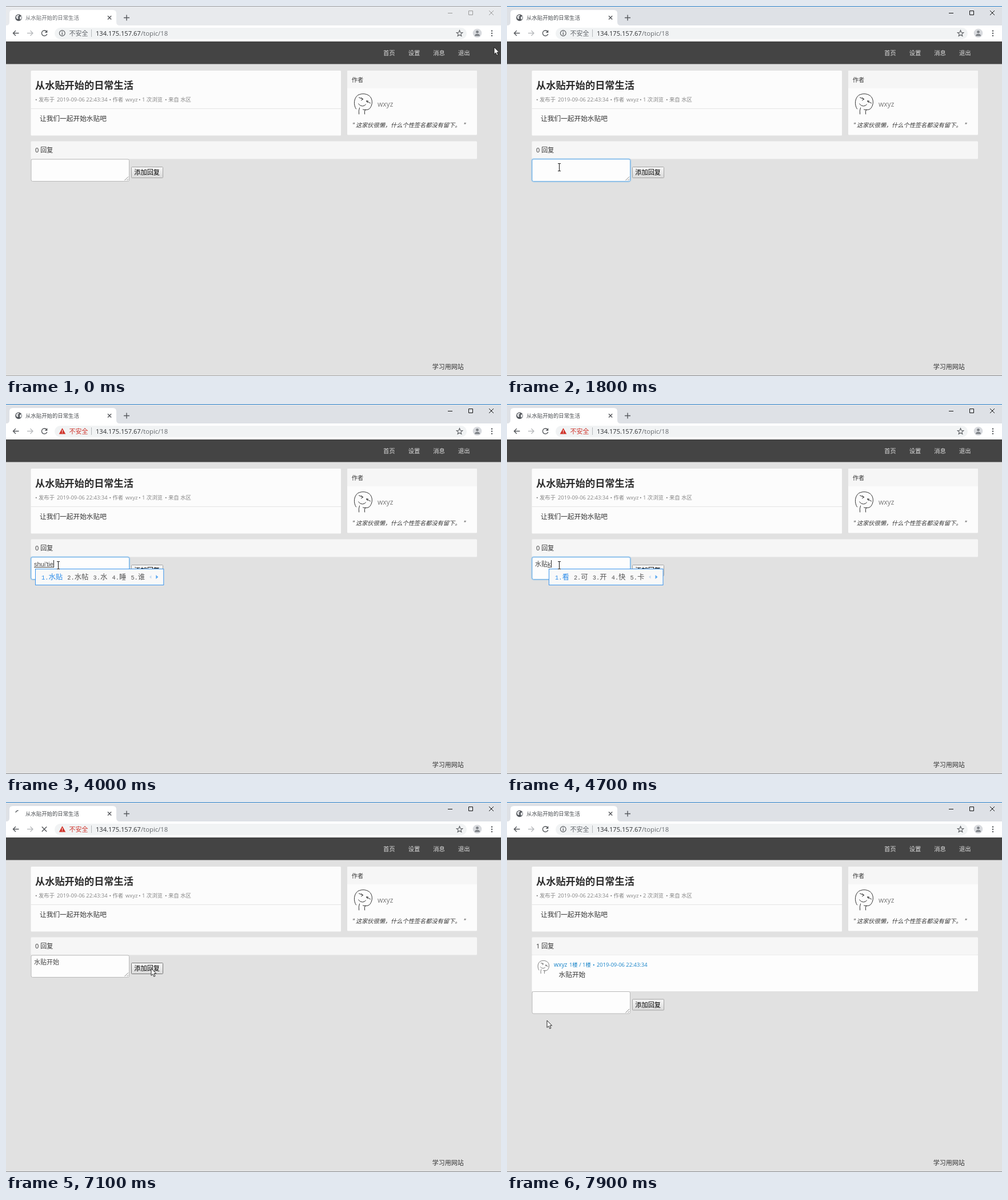
Recreate the animation shown at these times as an HTML page. Size 866 px wide and 647 px high, loop 8 s.

```html
<!DOCTYPE html>
<html lang="zh-CN">
<head>
<meta charset="utf-8">
<title>从水贴开始的日常生活</title>
<style>
html, body { margin: 0; width: 100%; height: 100%; overflow: hidden; background: #e1e1e1; }
svg { display: block; }
text { font-family: "Open Sans", "Noto Sans CJK SC", "Noto Sans CJK", sans-serif; white-space: pre; }
.line { fill: none; stroke: #55585c; stroke-width: 1.4; }
.meta { font-size: 9.4px; fill: #858585; }
.nav { font-size: 10.3px; fill: #dedede; }
.f11 { font-size: 11px; }
.body { font-size: 11.7px; fill: #333; }
.link { font-size: 9.4px; fill: #1482c8; }
#typed, #ime text { fill: #444; }
#typed { font-family: "Liberation Sans", "Noto Sans CJK SC", "Noto Sans CJK", sans-serif; font-size: 11px; }
#ime text { font-size: 12.4px; font-weight: 300; fill: #555; }
#ime text.first { fill: #2b8cea; }
#ime tspan { font-family: "Liberation Mono", monospace; font-size: 10.35px; }
</style>
</head>
<body>
<svg width="866" height="647" viewBox="0 0 866 647">
  <defs>
    <linearGradient id="face" x2="0" y2="1"><stop stop-color="#f7f7f7"/><stop offset="1" stop-color="#dadada"/></linearGradient>
    <g id="doodle" fill="none" stroke="#333" stroke-linecap="round">
      <path d="M4 27C-1 20 0 8 7 3 14-1 24 0 29 6 34 13 32 22 27 27 24 29 19 29 16 28M10 25Q8 30 9 36M20 28Q18 32 19 36"/>
      <path d="M9 7L16 10M13 7L16 10 13 12M22 13L29 17M25 13L22 13 24 16M8 18Q11 22 15 22 19 22 21 19"/>
    </g>
  </defs>

  <!-- browser frame -->
  <rect id="bar" width="866" height="34"/>
  <rect id="top" width="866" height="1"/>
  <path d="M0 34Q6 34 6 28V13Q6 7 12 7H187Q193 7 193 13V28Q193 34 199 34Z" fill="#fff"/>
  <rect y="34" width="866" height="28" fill="#fff"/>
  <g id="globe">
    <circle cx="22" cy="20.4" r="5.8" fill="#55595e"/>
    <path d="M18 18Q20 15 23 16L22 18 20 19 22 21 20 23Q17 21 18 18ZM24 19L27 18V22L25 24 24 22Z" fill="#e9eaec"/>
  </g>
  <path id="spin" d="M16.8 18.2A5.8 5.8 0 0 1 21.6 14.9" class="line"/>
  <text id="tab" x="34" y="24" font-size="9.4">从水贴开始的日常生活</text>
  <path class="line" d="M178 17.2L184.2 23.4M184.2 17.2L178 23.4"/>
  <path class="line" d="M206 20.5H216M211 15.5V25.5"/>
  <path id="win" fill="none" d="M773 12.5H781M809.5 8.5H816.5V15.5H809.5ZM845 8L853 16M853 8L845 16"/>
  <path class="line" d="M22.5 47.5H12.5M17 43L12.5 47.5 17 52"/>
  <path class="line" style="stroke:#b9bbbe" d="M37 47.5H47M42.5 43L47 47.5 42.5 52"/>
  <g id="reload">
    <path class="line" d="M71 44.5A4.8 4.8 0 1 0 71.8 49"/>
    <path d="M72.4 42V46.8H67.6Z" fill="#55585c"/>
  </g>
  <path id="stop" class="line" d="M62.8 43.2L71.2 51.8M71.2 43.2L62.8 51.8"/>
  <rect x="85" y="38" width="721" height="20" rx="10" fill="#f1f3f4"/>
  <g id="info">
    <circle cx="98.3" cy="47.5" r="4.9" class="line" style="stroke-width:1.1"/>
    <path d="M98.3 44.5V45.7M98.3 46.8V50.6" class="line"/>
  </g>
  <g id="warn">
    <path d="M98.5 42L104.3 52.5H92.7Z" fill="#d0342b"/>
    <path d="M98.5 45.6V48.8M98.5 49.8V51" stroke="#fff"/>
  </g>
  <text id="unsafe" x="110.5" y="51.5" class="f11">不安全</text>
  <rect x="149" y="41" width="1" height="13" fill="#b4b7ba"/>
  <text x="157" y="51.5" font-size="11.1" fill="#2b2d30">134.175.157.67</text>
  <text x="236" y="51.5" font-size="11.3" fill="#666a6e">/topic/18</text>
  <path d="M793.5 42.5L795 46.2 798.8 46.4 795.8 48.9 796.8 52.6 793.5 50.5 790.2 52.6 791.2 48.9 788.2 46.4 792 46.2Z" class="line" style="stroke-width:1.1"/>
  <circle cx="824.5" cy="47.5" r="7.8" fill="#d8dade"/>
  <path d="M820 52.5Q820 48.8 824.5 48.8T829 52.5Z" fill="#7c8085"/>
  <circle cx="824.5" cy="45.3" r="2.4" fill="#7c8085"/>
  <g fill="#55585c"><circle cx="850" cy="43.5" r="1.2"/><circle cx="850" cy="47.7" r="1.2"/><circle cx="850" cy="51.9" r="1.2"/></g>

  <!-- page -->
  <rect y="62" width="866" height="585" fill="#e1e1e1"/>
  <rect y="62" width="866" height="39.5" fill="#444"/>
  <g class="nav">
    <text x="660" y="86">首页</text><text x="703.7" y="86">设置</text>
    <text x="747.3" y="86">消息</text><text x="791" y="86">退出</text>
  </g>
  <rect x="43.5" y="113" width="542.5" height="113.5" rx="1.5" fill="#fcfcfc"/>
  <rect x="43.5" y="179" width="542.5" height="1" fill="#e4e4e4"/>
  <text x="51" y="145" font-size="17.2" font-weight="700" fill="#2c2c2c">从水贴开始的日常生活</text>
  <g class="meta">
    <text x="51" y="167">• 发布于</text><text x="89" y="167">2019-09-06 22:43:34</text>
    <text x="180.5" y="167">• 作者</text><text x="209" y="167">wxyz</text>
    <text id="views" x="232" y="167"></text><text x="278" y="167">• 来自 水区</text>
  </g>
  <text x="59" y="201.3" class="body">让我们一起开始水贴吧</text>
  <rect x="597" y="113" width="227" height="112.5" rx="1.5" fill="#fcfcfc"/>
  <rect x="597" y="113" width="227" height="31" rx="1.5" fill="#f6f6f6"/>
  <text x="604.8" y="132.6" font-size="10.2" fill="#333">作者</text>
  <use href="#doodle" x="608.5" y="153"/>
  <text x="650" y="175.5" font-size="12" fill="#777">wxyz</text>
  <g font-size="10.2" font-style="italic" fill="#333">
    <text x="606" y="212">"</text><text x="612" y="212">这家伙很懒，什么个性签名都没有留下。</text><text x="800.5" y="212">"</text>
  </g>
  <rect x="43.5" y="236.5" width="780.5" height="31" rx="1.5" fill="#f6f6f6"/>
  <text id="count" x="51" y="256.2" class="f11" fill="#333"></text>
  <g id="reply">
    <rect x="43.5" y="268" width="780.5" height="63" fill="#fdfdfd"/>
    <use href="#doodle" transform="translate(53.5 277) scale(.63)"/>
    <text x="82" y="288" font-size="10.3" fill="#1482c8">wxyz</text>
    <g class="link"><text x="109" y="288">1楼 / 1楼</text><text x="150" y="288">•</text><text x="157" y="288">2019-09-06 22:43:34</text></g>
    <text x="90.5" y="306" class="body">水贴开始</text>
  </g>
  <g id="form">
    <rect id="glow" x="43" y="267" width="173.5" height="40.5" rx="4" fill="none" stroke="#66afe9" stroke-width="2"/>
    <rect id="area" x="44" y="268" width="171.5" height="38.5" rx="2.5" fill="#fdfdfd"/>
    <path d="M207.5 305L214 298.5M211.5 305L214 302.5" stroke="#777" stroke-width=".9"/>
    <text id="typed" x="49" y="283.5"></text>
    <rect id="under" y="285" height="1" fill="#444"/>
    <rect id="caret" y="273" width="1" height="13" fill="#222"/>
    <rect id="btn" x="219.5" y="281.5" width="55" height="19" rx="1"/>
    <text x="224.3" y="295.3" font-size="11.2" fill="#000">添加回复</text>
  </g>
  <g id="ime"></g>
  <text x="745.7" y="634.6" class="f11" fill="#333">学习用网站</text>
  <rect id="bottom" y="646" width="866" height="1"/>
  <path id="arrow" d="M0 0V12.4L2.8 9.8 4.8 14.3 6.9 13.4 4.9 9H8.7Z" fill="#fff" stroke="#111" stroke-width=".9"/>
  <path id="beam" d="M-2.5-6.5H-.6L0-6 .6-6.5H2.5M0-6V6M-2.5 6.5H-.6L0 6 .6 6.5H2.5" fill="none" stroke="#222" stroke-width="1.1"/>
</svg>
<script>
const el = id => document.getElementById(id);
const show = (id, on) => el(id).style.display = on ? '' : 'none';
const set = (id, name, value) => el(id).setAttribute(name, value);
const write = (id, text) => { if (el(id).textContent !== text) el(id).textContent = text; };

// [start, committed text, composing text, candidates]
const typing = [
  [0, '', '', ''],
  [2300, '', 's', '是 上 说 时 三'],
  [2400, '', 'sh', '是 上 说 时 少'],
  [2500, '', 'shu', '数 输 书 熟 字符画：鼠'],
  [2700, '', 'shui', '水 睡 谁 税 说'],
  [4000, '', "shui'tie", '水贴 水帖 水 睡 谁'],
  [4400, '水贴', '', ''],
  [4700, '水贴', 'k', '看 可 开 快 卡'],
  [4900, '水贴', 'ka', '卡 咖 喀 咔 开'],
  [5100, '水贴', 'kai', '开 凯 楷 揩 慨'],
  [5200, '水贴', "kai's", '开始 开设 开 凯 楷'],
  [5300, '水贴', "kai'shi", '开始 开市 开释 开示 开'],
  [5400, '水贴开始', '', '']
];

// Pointer paths: start time, then one point per 100 ms
const paths = [
  [0, [854, 72], [790, 140], [670, 235], [520, 320], [390, 364], [285, 368], [195, 345], [130, 312], [98, 289], [91, 282]],
  [1000, [91.5, 282]],
  [6000, [104, 286], [150, 298], [218, 308], [278, 311], [303, 309], [278, 299], [254, 291]],
  [7200, [244, 310], [216, 366], [176, 428], [132, 462], [88, 460], [54, 442], [61, 414], [70, 382]]
];
const blinks = [1300, 1800, 2300, 3100, 3600, 5900, 6400, 6900];

const last = (list, t) => list.filter(item => item[0] <= t).pop();

function pointer(t) {
  const [start, ...points] = last(paths, t);
  return points[Math.min(points.length - 1, (t - start) / 100)];
}

function svg(name, attrs, text = '') {
  const node = document.createElementNS('http://www.w3.org/2000/svg', name);
  for (const key in attrs) node.setAttribute(key, attrs[key]);
  node.textContent = text;
  return node;
}

function drawIme(words, left) {
  const box = el('ime');
  box.replaceChildren();
  if (!words) return;
  let x = left + 11;
  const parts = words.split(' ').map((word, i) => {
    const item = svg('text', { x, y: 306.6, class: i ? '' : 'first' });
    item.append(svg('tspan', {}, i + 1 + '.'), word);
    x += 20.5 + word.length * 12.4;
    return item;
  });
  const end = x - 8;
  box.append(
    svg('rect', { x: left + .5, y: 288.5, width: end + 32 - left, height: 28, fill: '#f9f9f9', stroke: '#3b95ee' }),
    ...parts,
    svg('path', { d: `M${end + 11} 299.5V305.5L${end + 7.5} 302.5Z`, fill: '#c9dcef' }),
    svg('path', { d: `M${end + 19} 299V306L${end + 23} 302.5Z`, fill: '#5aa9f2' })
  );
}

function render(t) {
  const active = t >= 1200, loaded = t >= 7300, loading = t >= 7000 && !loaded;
  const warned = t >= 2300 && !loaded;
  const glow = Math.max(0, Math.min(1, (t - 1100) / 300, (7100 - t) / 200));
  const dy = loaded ? 63.5 : 0;

  set('bar', 'fill', active ? '#dee1e6' : '#e8eaed');
  set('top', 'fill', active ? '#2c83cd' : '#9b9da0');
  set('bottom', 'fill', active ? '#8a8d90' : '#a8a8a8');
  set('win', 'stroke', active ? '#111' : '#9a9a9a');
  set('tab', 'fill', active ? '#45494d' : '#686b6f');
  show('globe', !loading); show('spin', loading);
  show('reload', !loading); show('stop', loading);
  set('spin', 'transform', `rotate(${(7100 - t) * .6} 22 20.6)`);
  show('warn', warned); show('info', !warned);
  set('unsafe', 'fill', warned ? '#d0342b' : '#5f6368');

  write('views', `• ${loaded ? 2 : 1} 次浏览`);
  write('count', `${loaded ? 1 : 0} 回复`);
  show('reply', loaded);
  set('form', 'transform', `translate(0 ${dy})`);
  set('glow', 'opacity', glow * .35);
  set('area', 'stroke', glow > .5 ? '#6cb0ea' : '#b9b9b9');

  const [, done, draft, words] = last(typing, t);
  write('typed', loaded ? '' : done + draft);
  const from = 49 + done.length * 11;
  const to = done || draft ? 49 + el('typed').getComputedTextLength() : 49;
  set('under', 'x', from);
  set('under', 'width', draft ? Math.max(0, to - from) : 0);
  set('caret', 'x', Math.round(to));
  show('caret', blinks.filter(b => b <= t).length % 2);
  drawIme(words, from + 2);

  const [x, y] = pointer(t);
  const inArea = x > 44 && x < 216 && y > 268 + dy && y < 307 + dy;
  const hover = x > 219 && x < 275 && y > 281 + dy && y < 301 + dy;
  set('btn', 'fill', t === 6900 ? '#dcdcdc' : 'url(#face)');
  set('btn', 'stroke', hover ? '#777' : '#a3a3a3');
  show('beam', inArea); show('arrow', !inArea);
  set(inArea ? 'beam' : 'arrow', 'transform', `translate(${x} ${y})`);
}

const begin = performance.now();
let shown = -1;
function tick() {
  const t = Math.floor((performance.now() - begin) % 8000 / 100) * 100;
  if (t !== shown) render(shown = t);
  requestAnimationFrame(tick);
}
tick();
</script>
</body>
</html>
```
